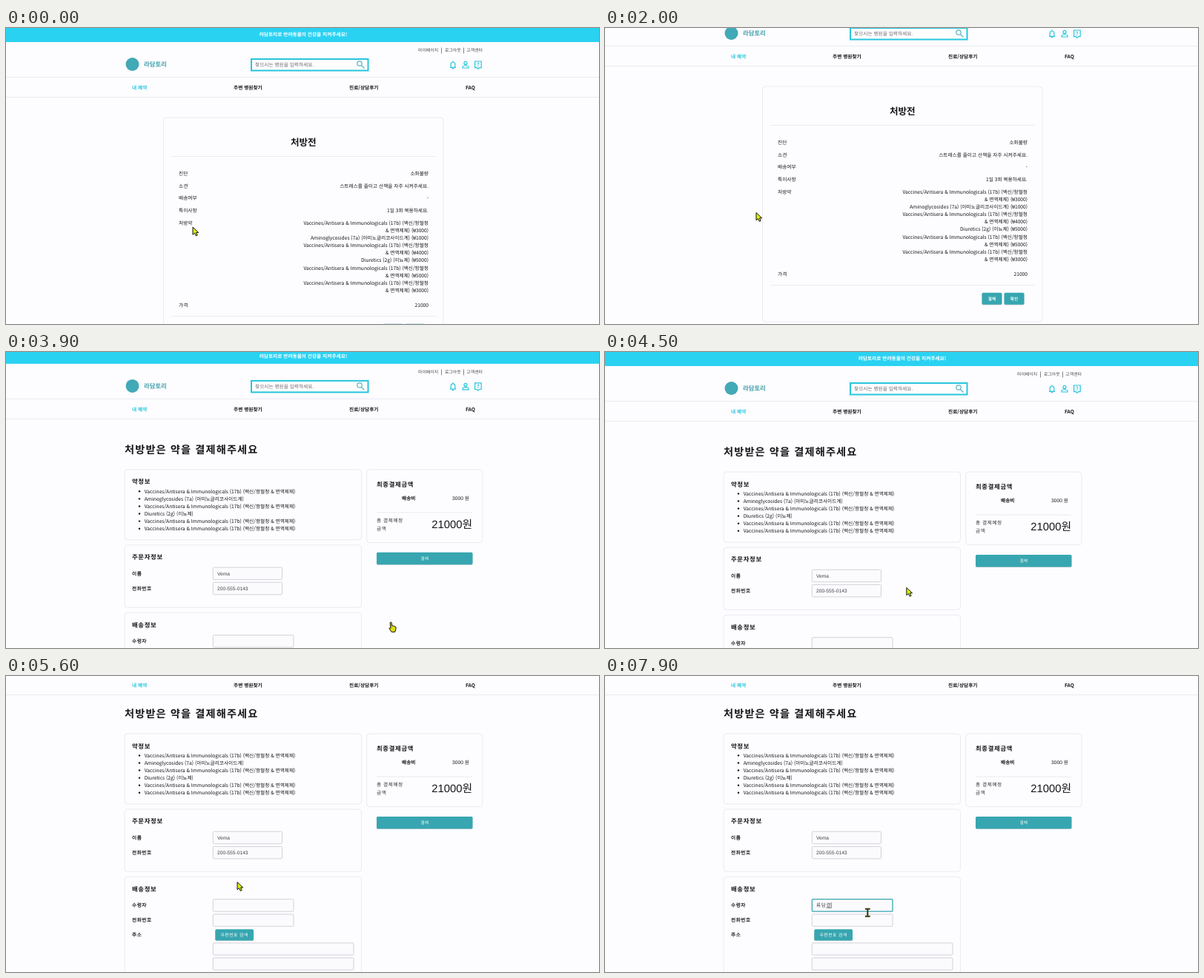
An HTML page for the animation above (8000 ms loop, 800 by 400 pixels).

```html
<!DOCTYPE html>
<html lang="ko">
<head>
<meta charset="utf-8">
<title>처방전 결제</title>
<style>
html, body { margin: 0; width: 100%; height: 100%; overflow: hidden; background: #fdfcff; }
svg { display: block; width: 800px; height: 400px; }
text { font-family: "Noto Sans CJK KR", "Noto Sans CJK", "Noto Sans", sans-serif; text-rendering: geometricPrecision; }
.arial { font-family: "Liberation Sans", "Noto Sans CJK KR", "Noto Sans CJK", sans-serif; }
</style>
</head>
<body>
<svg id="stage" viewBox="0 0 800 400">
  <g id="rx"></g>
  <g id="pay"></g>
  <g id="header"></g>
  <g id="cursor"></g>
</svg>
<script>
const LOOP = 8000, STEP = 100;
const CYAN = '#2ad2f2', ICON = '#27c6dc', TEAL = '#37a6b0', DARK = '#1d757c', INK = '#161618';
const LINE = '#ebeaef', FRAME = '#d3d2d8';
const BASE = 6.68;
const $ = id => document.getElementById(id);

function add(parent, tag, attrs, content) {
  const el = document.createElementNS('http://www.w3.org/2000/svg', tag);
  for (const k in attrs) el.setAttribute(k, attrs[k]);
  if (content !== undefined) el.textContent = content;
  parent.appendChild(el);
  return el;
}

// Text placed by its vertical centre.
function label(parent, x, cy, str, size = BASE, attrs = {}) {
  return add(parent, 'text', { x, y: cy + size * 0.37, 'font-size': size, fill: INK, ...attrs }, str);
}
const BOLD = { 'font-weight': 700 };
const MEDIUM = { stroke: INK, 'stroke-width': 0.18 };
const END = { 'text-anchor': 'end' };
const MID = { 'text-anchor': 'middle' };
const WIDE = { 'letter-spacing': '0.08em' };

const hline = (g, x1, x2, y) => add(g, 'path', { d: `M${x1} ${y}H${x2}`, stroke: LINE, fill: 'none' });
const box = (g, x, y, x2, y2, attrs) =>
  add(g, 'rect', { x, y, width: x2 - x, height: y2 - y, fill: 'none', stroke: LINE, ...attrs });
const card = (g, x, y, x2, y2) => box(g, x, y, x2, y2, { rx: 4 });
const input = (g, x, y, x2, y2) => box(g, x, y, x2, y2, { rx: 1.2, stroke: FRAME, fill: '#fbfafd' });

function button(g, x, y, x2, y2, str, size, attrs) {
  box(g, x, y + 0.7, x2, y2 + 0.7, { rx: 1.7, fill: '#000', stroke: 'none', opacity: 0.16 });
  const face = box(g, x, y, x2, y2, { rx: 1.7, fill: TEAL, stroke: 'none' });
  label(g, (x + x2) / 2, (y + y2) / 2, str, size, { fill: '#fff', ...MID, ...attrs });
  return face;
}

function buildHeader(g) {
  add(g, 'rect', { width: 800, height: 19, fill: CYAN });
  label(g, 401, 9, '라담토리로 반려동물의 건강을 지켜주세요!', BASE, { fill: '#fff', ...BOLD, ...MID });

  const small = { fill: '#444' };
  label(g, 556, 30.3, '마이페이지', 5.9, small);
  label(g, 592, 30.3, '로그아웃', 5.9, small);
  label(g, 621.3, 30.3, '고객센터', 5.9, small);
  add(g, 'path', { d: 'M587.5 26.5v8M617.5 26.5v8', stroke: '#666', 'stroke-width': 0.8 });

  add(g, 'circle', { cx: 170.5, cy: 49, r: 9, fill: '#42a9b6' });
  label(g, 186, 48.7, '라담토리', 8.4, { fill: '#42a0ac', ...BOLD });

  box(g, 331, 42, 488.5, 57.5, { stroke: ICON, 'stroke-width': 2, fill: '#fefeff' });
  label(g, 336, 49.8, '찾으시는 병원을 입력하세요.', BASE, { fill: '#6b6b70' });
  const icon = { fill: 'none', stroke: ICON, 'stroke-width': 1.2 };
  add(g, 'path', { ...icon, stroke: '#55b3be', d: 'M480.2 48a3.2 3.2 0 1 1-6.4 0a3.2 3.2 0 1 1 6.4 0M479.3 50.3l4.2 4.2' });
  add(g, 'path', { ...icon, d: 'M599 53.3h8M600.2 53v-4a2.8 3 0 0 1 5.6 0v4M603 46v-1.6M601.8 54.7h2.4' });
  add(g, 'path', { ...icon, d: 'M622 47.4a2 2 0 1 1-4 0a2 2 0 1 1 4 0M616 54v-1.3c0-2.6 8-2.6 8 0v1.3z' });
  add(g, 'path', { ...icon, d: 'M632.6 45h8.6v8.6h-2.8l-1.5 1.7l-1.5-1.7h-2.8z' });
  label(g, 636.9, 49.3, '?', 7, { fill: ICON, ...BOLD, ...MID });

  hline(g, 0, 800, 66.5);
  hline(g, 0, 800, 93.5);
  label(g, 170, 80.2, '내 예약', BASE, { fill: ICON, ...BOLD });
  label(g, 307, 80.2, '주변 병원찾기', BASE, BOLD);
  label(g, 463, 80.2, '진료/상담후기', BASE, BOLD);
  label(g, 620, 80.2, 'FAQ', BASE, BOLD);
}

const VACCINE = 'Vaccines/Antisera & Immunologicals (17b) (백신/항혈청';
const AMINO = 'Aminoglycosides (7a) (아미노글리코사이드계)';
const DIURETIC = 'Diuretics (2g) (이뇨제)';
const rest = price => `& 면역제제) (₩${price})`;

function buildRx(g) {
  card(g, 212.5, 121, 590, 439);
  label(g, 401.3, 154.3, '처방전', 12.6, { ...BOLD, ...MID });
  hline(g, 223, 580, 173.5);
  hline(g, 223, 580, 389.5);
  const rows = [['진단', '소화불량'], ['소견', '스트레스를 줄이고 산책을 자주 시켜주세요.'],
    ['배송여부', '-'], ['특이사항', '1일 3회 복용하세요.'], ['처방약', '']];
  rows.forEach(([name, value], i) => {
    const y = 196.4 + i * 16.8;
    label(g, 233, y, name);
    label(g, 570, y, value, BASE, END);
  });
  [VACCINE, rest(3000), AMINO + ' (₩1000)', VACCINE, rest(4000), DIURETIC + ' (₩5000)',
    VACCINE, rest(5000), VACCINE, rest(3000)]
    .forEach((s, i) => label(g, 570, 263.6 + i * 10.08, s, BASE, END));
  label(g, 233, 374.3, '가격');
  label(g, 570, 374.3, '21000', BASE, END);
  button(g, 538.5, 399.7, 565.5, 415.7, '확인', 5.6, BOLD);
  return button(g, 508.5, 399.7, 535.5, 415.7, '결제', 5.6, BOLD);
}

function buildPay(g) {
  const head = { ...BOLD, ...WIDE }, row = { ...MEDIUM, ...WIDE };
  const value = { class: 'arial', fill: '#44444a' };
  label(g, 160, 135, '처방받은 약을 결제해주세요', 14.2, head);

  card(g, 160, 162, 479.5, 257);
  label(g, 170, 178.5, '약정보', 8.35, head);
  const full = VACCINE + ' & 면역제제)';
  [full, AMINO, full, DIURETIC, full, full].forEach((s, i) => {
    const y = 191.2 + i * 10.08;
    label(g, 186.7, y, s);
    add(g, 'circle', { cx: 180, cy: y + 0.2, r: 1.2, fill: INK });
  });

  card(g, 160, 264, 479.5, 348.3);
  label(g, 170, 280, '주문자정보', 8.35, head);
  label(g, 170, 302.3, '이름', BASE, row);
  input(g, 279.3, 294.2, 372.5, 310.7);
  label(g, 285, 302.3, 'Vema', BASE, value);
  label(g, 170, 322.4, '전화번호', BASE, row);
  input(g, 279.3, 314.4, 372.5, 330.9);
  label(g, 285, 322.4, '200-555-0143', BASE, value);

  card(g, 160, 355.3, 479.5, 560);
  label(g, 170, 371.6, '배송정보', 8.35, head);
  label(g, 170, 393.8, '수령자', BASE, row);
  const field = input(g, 279.3, 385.7, 388, 402.2);
  label(g, 170, 414, '전화번호', BASE, row);
  input(g, 279.3, 405.9, 388, 422.3);
  label(g, 170, 434, '주소', BASE, row);
  button(g, 282.3, 426.2, 334, 441.4, '우편번호 검색', 5.9, WIDE);
  input(g, 279.3, 444.8, 469, 461);
  input(g, 279.3, 464.9, 469, 481.2);

  card(g, 486.7, 162, 643, 260.7);
  label(g, 500, 181.8, '최종결제금액', 8.35, head);
  label(g, 534, 200.6, '배송비', BASE, BOLD);
  label(g, 602, 200.6, '3000 원', BASE, { class: 'arial' });
  hline(g, 500, 629, 220);
  label(g, 500, 231, '총 결제예정', BASE, { ...WIDE, fill: '#333' });
  label(g, 500, 241.2, '금액', BASE, { ...WIDE, fill: '#333' });
  label(g, 629, 235.7, '21000원', 14.8, { class: 'arial', ...END });
  button(g, 500, 273.9, 629.5, 290.4, '결제', 5.7);

  const typed = label(g, 285, 393.8, '', BASE, { ...WIDE, ...value });
  const mark = add(g, 'path', { stroke: '#333', 'stroke-width': 0.6, fill: 'none' });
  return { field, typed, mark };
}

function buildCursors(g) {
  const look = { fill: '#dcf20a', stroke: '#111', 'stroke-width': 1, 'stroke-linejoin': 'round' };
  return {
    arrow: add(g, 'path', { ...look, d: 'M0 0V10.3L2.5 8.1L4.3 11.9L6.2 11L4.5 7.4H7.7Z' }),
    hand: add(g, 'path', { ...look, fill: '#dedb12',
      d: 'M-1.8 0C-1.8 -1.3 .1 -1.3 .2 0L.7 4.2C1.4 3.5 2.6 3.6 2.8 4.6C3.6 4 4.5 4.3 4.7 5.2C5.6 4.8 6.2 5.5 6.1 6.6L5.6 10L4.8 12.3H.2L-2.6 8.6C-3.4 7.2 -2.3 6.2 -1.2 7.2L-1 7.4Z' }),
    beam: add(g, 'path', { d: 'M-3.4 -5H3.4M0 -5V5M-3.4 5H3.4', fill: 'none', stroke: '#34380c', 'stroke-width': 2 })
  };
}

buildHeader($('header'));
const payButton = buildRx($('rx'));
const form = buildPay($('pay'));
const cursors = buildCursors($('cursor'));

const ease = (t, a, b) => {
  const p = Math.min(1, Math.max(0, (t - a) / (b - a)));
  return p * p * (3 - 2 * p);
};

// Cursor legs: start, end, destination.
const START = [252, 269];
const LEGS = [[0, 1300, 204, 249.5], [2200, 2800, 520, 366], [4050, 4900, 312, 278.5], [5700, 6400, 354.3, 319.8]];
const SWITCH = 3600, FOCUS = 6600, TYPE = 7000;
const STROKES = ['ㄹ', '류', '륟', '류다', '류담', '류담ㄱ', '류담겨', '류담결'];

function pointer(t) {
  let [x, y] = START;
  for (const [a, b, tx, ty] of LEGS) {
    const p = ease(t, a, b);
    x += (tx - x) * p;
    y += (ty - y) * p;
  }
  return [x, y];
}

function scrollAt(t) {
  if (t < SWITCH) return 42 * ease(t, 1650, 1970);
  if (t < 4500) return 42 * (1 - ease(t, SWITCH, 3960));
  return 84 * ease(t, 5000, 5370);
}

function showTyped(t) {
  const n = Math.min(STROKES.length, Math.floor((t - TYPE) / STEP) + 1);
  const str = n > 0 ? STROKES[n - 1] : '';
  form.typed.textContent = str;
  if (!str) return form.mark.setAttribute('d', '');
  const right = 285 + form.typed.getComputedTextLength();
  const left = right - (right - 285) / str.length;
  form.mark.setAttribute('d', `M${left} 397.3H${right}M${right + 0.3} 390V397.6`);
}

function render(time) {
  const t = Math.floor((time % LOOP) / STEP) * STEP;
  const s = scrollAt(t), paying = t >= SWITCH;
  $('rx').style.display = paying ? 'none' : '';
  $('pay').style.display = paying ? '' : 'none';
  $('rx').setAttribute('transform', `translate(0 ${-s})`);
  $('pay').setAttribute('transform', `translate(0 ${-s})`);
  // The menu sticks to the top once the banner has left.
  $('header').setAttribute('transform', `translate(0 ${-Math.min(s, 68)})`);

  const [x, y] = pointer(t);
  const hover = t >= 2700 && t < 4100;
  const shape = hover ? 'hand' : t > 5700 && y > 302 ? 'beam' : 'arrow';
  for (const k in cursors) cursors[k].style.display = k === shape ? '' : 'none';
  $('cursor').setAttribute('transform', `translate(${x} ${y})`);
  payButton.setAttribute('fill', hover ? DARK : TEAL);

  const focused = t >= FOCUS;
  form.field.setAttribute('stroke', focused ? TEAL : FRAME);
  form.field.setAttribute('stroke-width', focused ? 1.3 : 1);
  showTyped(t);
}

let origin;
function tick(now) {
  origin ??= now;
  render(now - origin);
  requestAnimationFrame(tick);
}
render(0);
requestAnimationFrame(tick);
</script>
</body>
</html>
```
